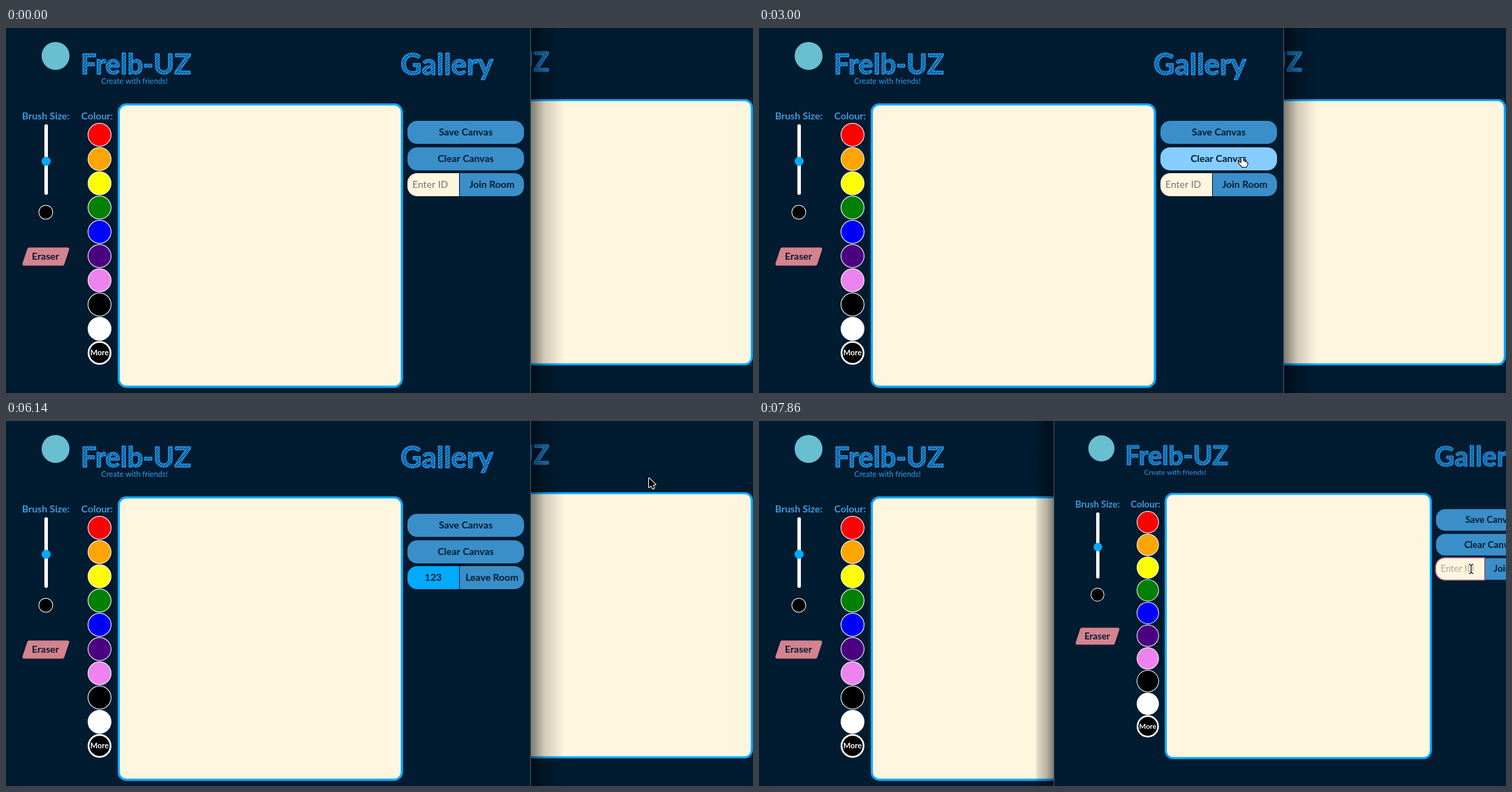
An HTML page with a canvas that plays this animation: 1070 by 523 pixels, repeating every 8000 ms.

```html
<!DOCTYPE html>
<html lang="en">
<head>
<meta charset="utf-8">
<title>Shared drawing board</title>
<style>
  html, body { margin: 0; width: 100%; height: 100%; overflow: hidden; background: #011b30; }
  canvas { display: block; }
</style>
</head>
<body>
<canvas id="stage" width="1070" height="523"></canvas>
<script>
const ctx = document.getElementById('stage').getContext('2d');
const W = 1070, H = 523, LOOP = 8000, STEPS_PER_MS = 0.007;
const NAVY = '#011b30', CREAM = '#fff6df', SKY = '#00aaff', BLUE = '#3a8fc9', HOVER = '#86ceff', LABEL = '#3f9bdc';
const SWATCHES = ['red', 'orange', 'yellow', 'green', 'blue', 'indigo', 'violet', 'black', 'white'];
const SCALE = 0.936, LEFT_EDGE = 752, AWAY = [-99, -99];

// Event times, in steps
const ENTER = 2, DRAW_START = 4.6, DRAW_END = 15.7, CLEARED = 21, TYPING = 30, JOINED = 36;
const RAISED = 47, DRAG_START = 48.6, DRAG_END = 53;

const clamp = u => Math.min(1, Math.max(0, u));
const smooth = u => u * u * (3 - 2 * u);
const mix = (a, b, u) => a + (b - a) * u;

// The zigzag leaves and reaches each corner along its longer axis, slowing down there.
const CORNERS = [[208,179], [299,150], [226,245], [376,196], [277,317], [447,266], [381,380], [495,366], [487,448], [510,482]];
const DOT_GAP = 9.5;
const dots = [CORNERS[0]];
CORNERS.slice(1).forEach(([x1, y1], i) => {
  const [x0, y0] = CORNERS[i];
  const wide = Math.abs(x1 - x0) > Math.abs(y1 - y0);
  const count = Math.round(Math.hypot(x1 - x0, y1 - y0) / DOT_GAP);
  for (let k = 1; k <= count; k++) {
    const along = smooth(k / count);
    const across = mix(along, smooth(along), 0.6);
    dots.push([mix(x0, x1, wide ? along : across), mix(y0, y1, wide ? across : along)]);
  }
});

// Pointer stops: arrival step, x, y. Each trip takes at most TRAVEL steps.
const STOPS = [
  [17, 711, 160], [20, 692, 186], [26, 694, 231], [28, 612, 224],
  [35, 700, 226], [43, 921, 82], [46, 1005, -25], [55, 1020, 212]
];
const TRAVEL = 2;

function pointerAt(step) {
  let [x, y] = dots.at(-1);
  for (const [arrival, tx, ty] of STOPS) {
    const u = smooth(clamp((step - arrival) / TRAVEL + 1));
    x = mix(x, tx, u);
    y = mix(y, ty, u);
  }
  return [x, y];
}

function text(str, x, y, size = 14, color = NAVY, weight = 700, align = 'center') {
  ctx.font = `${weight} ${size}px Lato, sans-serif`;
  ctx.textAlign = align;
  ctx.fillStyle = color;
  ctx.fillText(str, x, y);
}

function paint(fill, stroke, width) {
  if (stroke) { ctx.strokeStyle = stroke; ctx.lineWidth = width; ctx.stroke(); }
  if (fill) { ctx.fillStyle = fill; ctx.fill(); }
}

function disc(x, y, r, fill, stroke, width = 2) {
  ctx.beginPath();
  ctx.arc(x, y, r, 0, 7);
  paint(fill, stroke, width);
}

function box(x, y, w, h, radius, fill, stroke, width) {
  ctx.beginPath();
  ctx.roundRect(x, y, w, h, radius);
  paint(fill, stroke, width);
}

function shape(path, fill, stroke, width) {
  const outline = new Path2D(path);
  ctx.lineJoin = 'round';
  ctx.strokeStyle = stroke;
  ctx.lineWidth = width;
  ctx.stroke(outline);
  ctx.fillStyle = fill;
  if (fill) ctx.fill(outline);
}

function makeHatch() {
  const tile = document.createElement('canvas');
  tile.width = tile.height = 8;
  const c = tile.getContext('2d');
  c.fillStyle = '#1d86d2';
  c.fillRect(0, 0, 8, 8);
  c.strokeStyle = NAVY;
  for (let d = -8; d <= 8; d += 4) {
    c.moveTo(d, 8);
    c.lineTo(d + 8, 0);
  }
  c.stroke();
  return ctx.createPattern(tile, 'repeat');
}
const hatch = makeHatch();

function sketchTitle(str, x, y, size) {
  text(str, x, y, size, hatch, 700, 'left');
  ctx.strokeStyle = '#2196ea';
  ctx.lineWidth = 1.3;
  ctx.lineJoin = 'round';
  ctx.strokeText(str, x, y);
}

// Clickable areas: x, y, width, height
const AREA = {
  canvas: [161.5, 109.5, 405.5, 404.5],
  save: [575, 133, 167, 33],
  clear: [575, 171, 167, 33],
  input: [575, 208, 74, 33],
  room: [650, 208, 92, 33]
};
const isOver = ([mx, my], name) => {
  const [x, y, w, h] = AREA[name];
  return mx >= x && mx <= x + w && my >= y && my <= y + h;
};

function button(name, label, radius, mouse) {
  const [x, y, w, h] = AREA[name];
  box(x, y, w, h, radius, isOver(mouse, name) ? HOVER : BLUE);
  text(label, x + w / 2, y + 21);
}

function board({ mouse, spread = 0, typed = '', joined = false, dotCount = 0 }) {
  disc(71 - spread, 40, 20, '#68bfd0');
  sketchTitle('Frelb-UZ', 107 - spread, 65.5, 40);
  text('Create with friends!', 184 - spread, 80, 11, '#2d9ff0', 400);
  sketchTitle('Gallery', 565 + spread, 67, 42);

  text('Brush Size:', 57, 131, 14, LABEL);
  text('Colour:', 130.5, 131, 14, LABEL);
  box(55, 138, 5, 101, 2, '#fff');
  disc(57.5, 191, 6.5, SKY);
  disc(57, 264, 9.5, '#000', '#fff');
  shape('M33 317H88L81 338H26Z', '#d5828f', '#d5828f', 5);
  text('Eraser', 56.5, 332);

  SWATCHES.forEach((color, i) => disc(134, 153 + 34.75 * i, 16, color, '#fff'));
  disc(134, 465.5, 14.5, '#000', '#fff', 5);
  text('More', 134, 469, 11, '#fff');

  box(...AREA.canvas, 11, CREAM, SKY, 3);
  box(163, 111, 402.5, 401.5, 9.5, CREAM);
  ctx.lineWidth = 3;
  ctx.strokeStyle = SKY;
  ctx.beginPath();
  ctx.roundRect(...AREA.canvas, 11);
  ctx.stroke();
  dots.slice(0, dotCount).forEach(([x, y]) => disc(x, y, 10, '#000'));

  button('save', 'Save Canvas', 14, mouse);
  button('clear', 'Clear Canvas', 14, mouse);
  button('room', joined ? 'Leave Room' : 'Join Room', [0, 14, 14, 0], mouse);
  const focused = isOver(mouse, 'input') && !joined;
  box(...AREA.input, [14, 0, 0, 14], joined ? SKY : CREAM, focused && '#a8486c', 3);
  if (joined) text(typed, 612, 229);
  else if (typed) text(typed, 582, 229, 14, NAVY, 400, 'left');
  else text('Enter ID', 582, 229, 14, focused ? '#aaa69a' : '#757575', 400, 'left');
}

function pane(left, right, dx, dy, scale, options) {
  ctx.save();
  ctx.beginPath();
  ctx.rect(left, 0, right - left, H);
  ctx.clip();
  ctx.fillStyle = NAVY;
  ctx.fillRect(left, 0, right - left, H);
  ctx.translate(dx, dy);
  ctx.scale(scale, scale);
  board(options);
  ctx.restore();
}

function edgeShadow(x, reach, middle, end) {
  const g = ctx.createLinearGradient(x, 0, x + reach, 0);
  [0.5, middle, end].forEach((alpha, i) => g.addColorStop([0, 0.4, 1][i], `rgba(0,0,0,${alpha})`));
  ctx.fillStyle = g;
  ctx.fillRect(x, 0, reach, H);
}

function edgeLine(x) {
  ctx.fillStyle = '#46596a';
  ctx.fillRect(x, 0, 1, H);
}

function drawPointer([x, y], kind) {
  ctx.save();
  ctx.translate(x, y);
  if (kind === 'text') {
    const beam = 'M-3-7L0-5L3-7M0-5V5M-3 7L0 5L3 7';
    shape(beam, null, '#fff', 3);
    shape(beam, null, '#111', 1.3);
  } else if (kind === 'hand') {
    shape('M-1 0H1L2 5L6 6L8 8L6 13H0L-5 7L-3 6L-1 8Z', '#fff', '#111', 2);
  } else {
    shape('M0 0V13L3 10.5L5.5 15L7.5 14L5.5 9.5L9.5 9Z', '#000', '#fff', 2);
  }
  ctx.restore();
}

function render(ms) {
  const step = Math.floor((ms + 3) * STEPS_PER_MS);
  const drawn = Math.floor(clamp((step - DRAW_START) / (DRAW_END - DRAW_START)) * dots.length);
  const mouse = step < ENTER ? AWAY
    : step < DRAW_END ? dots[Math.min(drawn + 1, dots.length - 1)]
    : pointerAt(step);

  const raised = step >= RAISED;
  const drag = clamp((step - DRAG_START) / (DRAG_END - DRAG_START));
  const dx = 537.5 - 106 * drag, dy = 0.8 + drag;
  const rightEdge = Math.floor(dx - 9.5);
  const local = raised ? [(mouse[0] - dx) / SCALE, (mouse[1] - dy) / SCALE] : mouse;

  const drawLeft = () => pane(0, LEFT_EDGE, 0, 0, 1, {
    mouse: raised ? AWAY : mouse,
    typed: '123'.slice(0, Math.max(0, step - TYPING)),
    joined: step >= JOINED,
    dotCount: step < CLEARED ? drawn : 0
  });
  const drawRight = () => pane(rightEdge, W, dx, dy, SCALE, { mouse: raised ? local : AWAY, spread: 8 });

  if (raised) {
    drawLeft();
    edgeShadow(rightEdge, -25, 0.28, 0.09);
    drawRight();
    edgeLine(rightEdge);
  } else {
    drawRight();
    drawLeft();
    edgeShadow(LEFT_EDGE, 48, 0.18, 0);
    edgeLine(LEFT_EDGE - 1);
  }

  if (!raised && isOver(mouse, 'canvas')) {
    ctx.globalCompositeOperation = 'difference';
    disc(...mouse, 18, null, CREAM, 1.3);
    ctx.globalCompositeOperation = 'source-over';
  }
  const overButton = ['save', 'clear', 'room'].some(name => isOver(local, name));
  drawPointer(mouse, isOver(local, 'input') ? 'text' : overButton ? 'hand' : 'arrow');
}

const start = performance.now();
function tick() {
  render((performance.now() - start) % LOOP);
  requestAnimationFrame(tick);
}
tick();
</script>
</body>
</html>
```
